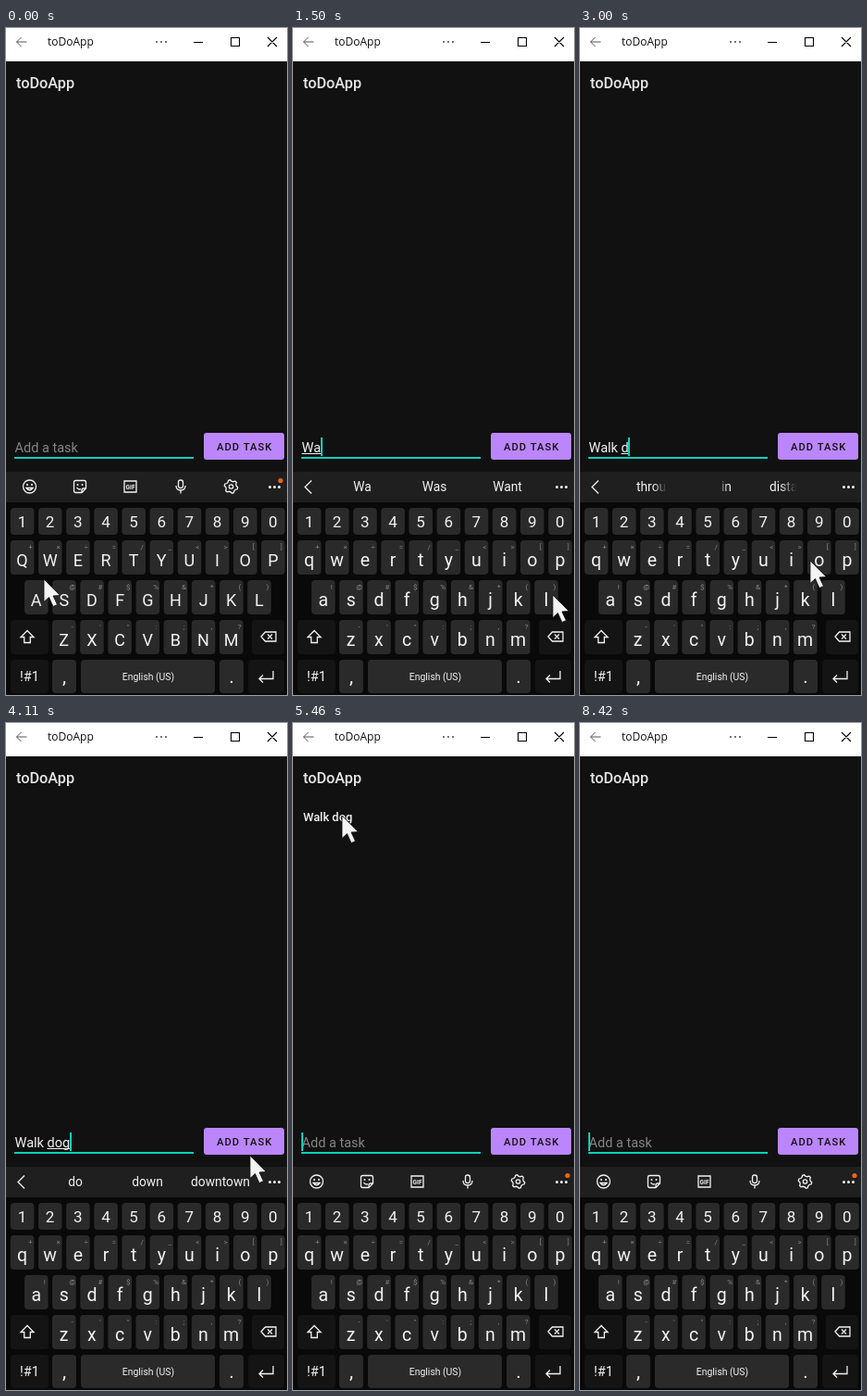
An HTML page with a canvas that plays this animation: 304x720 px, repeating every 8.57 s.

```html
<!DOCTYPE html>
<html lang="en">
<head>
<meta charset="utf-8">
<title>toDoApp</title>
<style>
html, body { margin: 0; width: 304px; height: 720px; overflow: hidden; background: #111; }
canvas { display: block; }
</style>
</head>
<body>
<canvas id="stage" width="304" height="720"></canvas>
<script>
const c = document.getElementById('stage').getContext('2d');
const LOOP = 8570, STEP = 136.15;
const TEAL = '#0fcfbd', WHITE = '#f2f2f2';

// Typed text, suggestions and pointer are keyed by step number.
const typed = [[0, ''], [3, 'W'], [9, 'Wa'], [12, 'Wal'], [15, 'Walk'], [18, 'Walk '],
  [21, 'Walk d'], [25, 'Walk do'], [29, 'Walk dog'], [33, '']];

// A word is centred in its slot, or [text, left, opaque x, clear x] while it wipes.
const hints = [
  [3, ['W', 'We', 'What']],
  [10, ['Wa', 'Was', 'Want']],
  [13, ['Wal', 'Walk', 'Wall']],
  [16, [['Walk', 61, 83, 95], ['Walking', 133, 171, 183]], 1],
  [17, ['Walk', 'Walking'], 1],
  [19, ['through', 'in', 'distance']],
  [22, [['through', 61, 79, 94], ['in', 153, 160, 150], ['distance', 205, 217, 234]]],
  [23, ['d', 'do', 'day']],
  [26, ['do', 'down', 'downtown']],
  [31, ['dog', 'dogs', 'doggy']]
];

const path = [[0, 41, 595], [2, 45, 578], [4, 45, 578], [7, 33, 618], [9, 33, 618],
  [11, 281, 612], [12, 281, 612], [14, 244, 617], [15, 244, 617], [16, 161, 698],
  [18, 161, 698], [20, 92, 617], [21, 92, 617], [22, 249, 575], [25, 250, 576],
  [28, 150, 618], [29, 150, 618], [30, 264, 467], [32, 268, 455], [34, 268, 455],
  [38, 52, 84], [40, 53, 100], [50, 53, 100], [52, 168, 300], [53, 168, 300]];

const current = (list, n) => list.filter(e => e[0] <= n).pop();

function text(s, x, y, size, color = WHITE, align = 'left', weight = 400, family = 'Roboto') {
  c.font = `${weight} ${size}px ${family}, sans-serif`;
  c.textAlign = align;
  c.fillStyle = color;
  c.fillText(s, x, y);
}

function rect(x, y, w, h, color, r = 0) {
  c.fillStyle = color;
  c.beginPath();
  c.roundRect(x, y, w, h, r);
  c.fill();
}

function dot(x, y, r, color) {
  c.fillStyle = color;
  c.beginPath();
  c.arc(x, y, r, 0, 7);
  c.fill();
}

function line(d, x = 0, y = 0, color = WHITE, width = 1.3) {
  c.save();
  c.translate(x, y);
  c.strokeStyle = color;
  c.lineWidth = width;
  c.stroke(new Path2D(d));
  c.restore();
}

const circle = r => `M${r} 0A${r} ${r} 0 1 1 ${-r} 0A${r} ${r} 0 1 1 ${r} 0`;

function drawWindow() {
  rect(0, 0, 304, 720, '#111');
  rect(0, 0, 304, 36, '#fff');
  line('M22.5 15H11.5M16.5 10L11.5 15L16.5 20', 0, 0, '#555', 1);
  text('toDoApp', 45, 19, 12, '#111', 'left', 400, '"Open Sans"');
  for (const x of [163, 168, 173]) dot(x, 15, 0.9, '#333');
  line('M203 15.5H213M243.5 10.5H252.5V19.5H243.5ZM283 10L293 20M293 10L283 20', 0, 0, '#000', 1.1);
  text('toDoApp', 11, 65, 16.3, '#e6e6e6', 'left', 500);
}

function drawForm(value, caret) {
  if (value) text(value, 9.5, 457.5, 14.5);
  else text('Add a task', 9.5, 457.5, 14.5, '#858585');
  c.font = '400 14.5px Roboto, sans-serif';
  const end = 9.5 + c.measureText(value).width;
  const word = value.split(' ').pop();
  const start = end - c.measureText(word).width;
  if (word) rect(start, 459, end - start, 1, WHITE);
  rect(9, 463, 194, 2, TEAL);
  if (caret) rect(Math.round(end - 0.5), 442, 2, 20, TEAL);
  rect(214, 437, 87, 29, '#bb86fc', 3);
  c.letterSpacing = '1px';
  text('ADD TASK', 228, 456, 11.2, '#111', 'left', 500);
  c.letterSpacing = '0px';
}

function drawTools() {
  line(circle(7), 25.5, 495);
  line('M-3.5 1.5Q0 6 3.5 1.5Z', 25.5, 495);
  dot(23, 493, 1.1, WHITE);
  dot(28, 493, 1.1, WHITE);

  line('M-6.5 -4.5Q-6.5 -6.5 -4.5 -6.5H4.5Q6.5 -6.5 6.5 -4.5V2L2 6.5H-4.5Q-6.5 6.5 -6.5 4.5ZM6.5 2H4Q2 2 2 4V6.5M-3.5 1Q-1.5 4 1 2.5', 80, 495);
  dot(77.5, 493, 1, WHITE);
  dot(82.5, 493, 1, WHITE);

  line('M-6.5 -6H6.5V6H-6.5Z', 134.5, 495);
  text('GIF', 134.5, 497.5, 6.5, WHITE, 'center', 700);

  line('M0 -7Q-2.5 -7 -2.5 -4.5V-1Q-2.5 1.5 0 1.5Q2.5 1.5 2.5 -1V-4.5Q2.5 -7 0 -7ZM-5 -1Q-5 4 0 4Q5 4 5 -1M0 4V7.5', 189, 495);

  let gear = '';
  for (let i = 0; i < 24; i++) {
    const r = i % 4 < 2 ? 7.3 : 5.7, a = (i + 0.5) * Math.PI / 12;
    gear += (i ? 'L' : 'M') + r * Math.cos(a) + ' ' + r * Math.sin(a);
  }
  line(gear + 'Z', 243.5, 495);
  line(circle(2.2), 243.5, 495);
  dot(297, 488.5, 2.6, '#f26410');
}

function drawWalker(x, shirt, hair, alpha) {
  c.globalAlpha = alpha;
  dot(x, 490.5, 1.8, '#b87850');
  rect(x - 2, 488, 4, 2, hair, 1);
  rect(x - 1.8, 492, 3.6, 5, shirt, 1);
  line('M-2 -2L-3 2M2 -2L3.5 1', x, 495, '#b87850', 1);
  line('M0 1.5L-2.5 7M0 1.5L2.5 7', x, 495, '#3d4a68', 1.8);
  c.globalAlpha = 1;
}

function drawHints([n, words, walkers]) {
  line('M20 488.5L13 495.5L20 502.5');
  words.forEach((w, i) => {
    if (typeof w === 'string') return text(w, [75, 153, 232][i], 500, 13.8, WHITE, 'center');
    const [s, x, opaque, clear] = w;
    const fade = c.createLinearGradient(opaque, 0, clear, 0);
    fade.addColorStop(0, WHITE);
    fade.addColorStop(1, '#f2f2f200');
    text(s, x, 500, 13.8, fade);
  });
  if (walkers) {
    const alpha = n === 16 ? 0.65 : 1;
    drawWalker(211.5, '#b13a78', '#6b3324', alpha);
    drawWalker(251.5, '#3969b0', '#6b3324', alpha);
  }
}

function keyRow(chars, marks, x0, y, h, size, base) {
  [...chars].forEach((ch, i) => {
    const x = x0 + i * 30.15;
    rect(x - 12.7, y, 25.6, h, '#2a2a2a', 4);
    text(ch, x, base, size, WHITE, 'center');
    if (marks) text(marks[i], x + 9, y + 10, 8, '#858585', 'center');
  });
}

function drawKeyboard(upper) {
  const fit = s => upper ? s.toUpperCase() : s;
  const size = upper ? 18 : 19.5;
  rect(0, 512, 304, 208, '#090909');
  keyRow('1234567890', '', 17.5, 518, 29, 17, 539);
  keyRow(fit('qwertyuiop'), '+×÷=/_<>[]', 17.5, 553, 37, size, 581);
  keyRow(fit('asdfghjkl'), '!@#$%&*()', 32.7, 596, 37, size, 624);
  keyRow(fit('zxcvbnm'), '-\'":;,?', 62.7, 639, 37, size, 667);

  const dark = '#141414', light = '#2a2a2a';
  rect(5, 639, 41, 37, dark, 4);
  rect(266, 639, 35, 37, dark, 4);
  rect(5, 682, 41, 36, dark, 4);
  rect(50, 682, 26, 36, light, 4);
  rect(81, 682, 145, 36, light, 4);
  rect(231, 682, 26, 36, light, 4);
  rect(262, 682, 39, 36, dark, 4);

  line('M0 -7L7 0H3.3V6H-3.3V0H-7Z', 23, 657.5);
  line('M-8 0L-3.5 -5H8V5H-3.5ZM-1 -2.5L4 2.5M4 -2.5L-1 2.5', 284, 657);
  line('M8 -6V2.5H-7M-3 -1.5L-7 2.5L-3 6.5', 281, 700);
  text('!#1', 25.5, 705, 14.5, WHITE, 'center');
  text(',', 63, 707, 21, WHITE, 'center');
  text('English (US)', 154, 704, 10.4, WHITE, 'center');
  text('.', 244, 707, 21, WHITE, 'center');
}

function drawPointer(n) {
  const i = path.findIndex(p => p[0] > n);
  if (i < 0) return;
  const [a, ax, ay] = path[i - 1], [b, bx, by] = path[i];
  const k = (n - a) / (b - a);
  c.save();
  c.translate(ax + (bx - ax) * k, ay + (by - ay) * k);
  const arrow = new Path2D('M0 0V24.5L5.5 19.5L10 29.5L14.5 27.5L10 18L17.5 17.5Z');
  c.fillStyle = '#f4f4f4';
  c.fill(arrow);
  c.strokeStyle = '#111';
  c.lineWidth = 0.8;
  c.stroke(arrow);
  c.restore();
}

function draw(t) {
  const n = t < 150 ? 0 : Math.floor((t - 135) / STEP) + 1;
  const value = current(typed, n)[1];
  const hidden = t < 150 || [[5980, 6530], [6930, 7470], [7870, 8420]].some(([a, b]) => t >= a && t < b);

  drawWindow();
  if (n >= 34 && t < 6650) {
    c.globalAlpha = t < 6530 ? 1 : 0.4;
    text('Walk dog', 11, 105.5, 12.9, WHITE, 'left', 500);
    c.globalAlpha = 1;
  }
  drawForm(value, !hidden);
  rect(0, 479, 304, 33, '#1f1f1f');
  if (value) drawHints(current(hints, n));
  else drawTools();
  for (const x of [285.5, 290.5, 295.5]) dot(x, 495.5, 1.5, WHITE);
  drawKeyboard(n < 3);
  drawPointer(n);
}

const began = performance.now();
function tick() {
  draw((performance.now() - began) % LOOP);
  requestAnimationFrame(tick);
}
tick();
</script>
</body>
</html>
```
